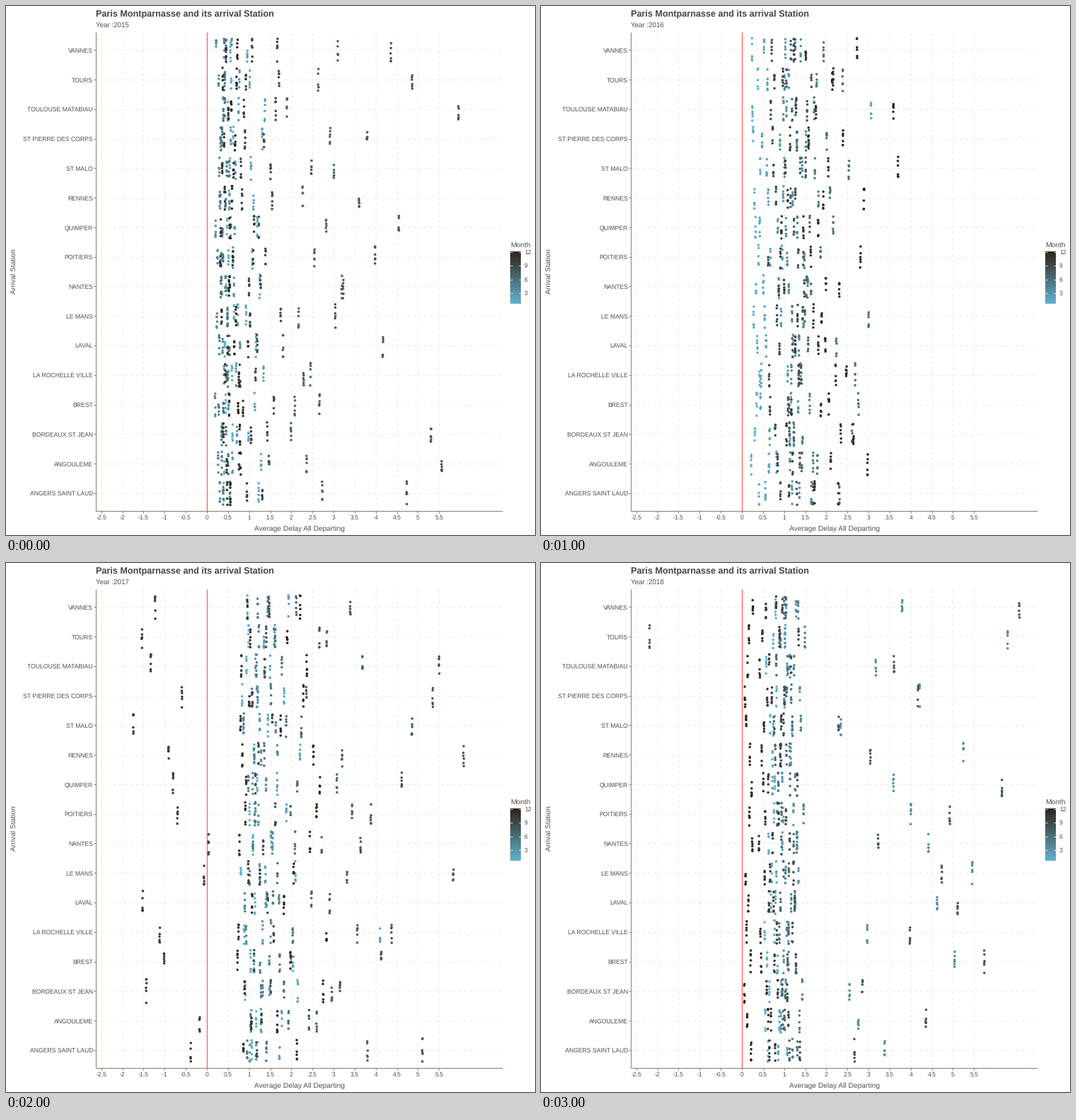
A matplotlib script for the animation above (4000 ms loop, 748 by 748 pixels).

```python
import matplotlib.pyplot as plt
import numpy as np
from matplotlib.animation import FuncAnimation
from matplotlib.colors import LinearSegmentedColormap

SIZE, DPI = 748, 100
PT = 72 / DPI
LEFT, RIGHT, TOP, BOTTOM = 127.5, 702, 37, 713.8
ZERO_X, UNIT = 284, 59.7
FIRST_Y, ROW = 62.3, 41.77
TRIPS = 6
INK, AXIS, GRID = "#505050", "#8b7d6b", "#ecece4"
STATIONS = ["VANNES", "TOURS", "TOULOUSE MATABIAU", "ST PIERRE DES CORPS",
            "ST MALO", "RENNES", "QUIMPER", "POITIERS", "NANTES", "LE MANS",
            "LAVAL", "LA ROCHELLE VILLE", "BREST", "BORDEAUX ST JEAN",
            "ANGOULEME", "ANGERS SAINT LAUD"]

# Mean delay per month, January to December
MEANS = {
    2015: [.52, 1.15, .65, .3, .39, .45, 2.5, 3.7, 1.45, .94, .43, .66],
    2016: [.33, .55, 1.02, 1.22, 1.5, 2.2, 1.4, 1.32, .78, 1.13, 1.9, 2.35],
    2017: [1, 1.8, 1.27, 1.42, 1.08, 1.75, 2.9, 4.25, 1.35, -.75, .9, 2.25],
    2018: [.68, .9, 1.15, 3.9, 1.25, 1.1, .95, 3.7, 1.15, .78, .53, .16],
}
# Delays that stand out, by station and month
EXTREMES = {
    2015: {("TOULOUSE MATABIAU", 8): 5.96, ("ANGOULEME", 8): 5.56,
           ("BORDEAUX ST JEAN", 8): 5.31, ("TOURS", 8): 4.86},
    2016: {("ST MALO", 12): 3.7, ("TOULOUSE MATABIAU", 12): 3.59,
           ("TOULOUSE MATABIAU", 2): 3.06, ("LE MANS", 6): 3},
    2017: {("ST MALO", 10): -1.74, ("LAVAL", 10): -1.52,
           ("TOULOUSE MATABIAU", 8): 5.5, ("LA ROCHELLE VILLE", 2): 4.1},
    2018: {("TOURS", 8): -2.19, ("TOURS", 4): 6.29, ("VANNES", 8): 6.57,
           ("QUIMPER", 8): 6.16, ("BREST", 8): 5.74},
}
YEARS = list(MEANS)
month_map = LinearSegmentedColormap.from_list("month", ["#62b1cc", "#32241c"])

plt.rcParams.update({"font.family": "Liberation Sans", "text.hinting": "none"})


def year_points(year):
    """Spread each month's delays over the stations, wider for long delays."""
    rng = np.random.default_rng(year)
    ranks = np.linspace(-1.6, 1.6, len(STATIONS))
    delay = np.empty((len(STATIONS), 12))
    for month, mean in enumerate(MEANS[year]):
        spread = .06 + .06 * mean ** 2 + .4 * (mean < 0)
        delay[:, month] = mean + spread * rng.permutation(ranks)
    for (station, month), value in EXTREMES[year].items():
        delay[STATIONS.index(station), month - 1] = value
    shape = (len(STATIONS), 12, TRIPS)
    rows = FIRST_Y + ROW * np.arange(len(STATIONS))
    x = ZERO_X + UNIT * delay[:, :, None] + rng.uniform(-.4, .4, shape)
    y = rows[:, None, None] + rng.uniform(-.4, .4, shape) * ROW
    return np.column_stack([x.ravel(), y.ravel()])


points = {year: year_points(year) for year in YEARS}

fig = plt.figure(figsize=(SIZE / DPI, SIZE / DPI), dpi=DPI, facecolor="white")
ax = fig.add_axes([0, 0, 1, 1])
ax.axis("off")


def label(x, y, text, px, ha="left", color=INK, **kwargs):
    return ax.text(x, y, text, fontsize=px * PT, ha=ha, color=color, **kwargs)


def line(x0, y0, x1, y1, color, width=1, **kwargs):
    ax.plot([x0, x1], [y0, y1], color=color, lw=width * PT,
            solid_capstyle="butt", **kwargs)


dashes = dict(dashes=(4, 4), zorder=1)
for i, name in enumerate(STATIONS):
    y = FIRST_Y + ROW * i
    line(LEFT, y, RIGHT, y, GRID, **dashes)
    line(LEFT - 3, y, LEFT, y, AXIS)
    label(123, y + 3.4, name, 8.6, "right")
for tick in np.arange(-2.5, 5.6, .5):
    x = ZERO_X + UNIT * tick
    line(x, BOTTOM, x, TOP, GRID, **dashes)
    line(x, BOTTOM, x, BOTTOM + 3, AXIS)
    label(x, 726, f"{tick:g}", 8.6, "center")
line(LEFT, TOP, LEFT, BOTTOM, AXIS)
line(LEFT, BOTTOM, RIGHT, BOTTOM, AXIS)
line(ZERO_X, TOP, ZERO_X, BOTTOM, "#ff3030", 1.1, alpha=.85, zorder=4)

label(127, 15, "Paris Montparnasse and its arrival Station", 12.63,
      color="#444444", weight="bold")
subtitle = label(127, 31, "", 9.8)
label(414.8, 741.5, "Average Delay All Departing", 10.25, "center")
label(11, 375.3, "Arrival Station", 10.25, "center", va="center", rotation=90)

# Colour bar
label(713, 340.5, "Month", 10.2)
ax.imshow(np.linspace(1, 0, 100)[:, None], cmap=month_map, aspect="auto",
          extent=(713, 728, 420.5, 346.5), zorder=2)
for month in (3, 6, 9, 12):
    y = 347.5 + 6.5 * (12 - month)
    line(713, y, 716, y, "white", .8, zorder=3)
    line(725, y, 728, y, "white", .8, zorder=3)
    label(733, y + 3.4, str(month), 8.6)

month_share = np.tile(np.repeat(np.linspace(0, 1, 12), TRIPS), len(STATIONS))
dots = ax.scatter(*points[YEARS[0]].T, s=(3.5 * PT) ** 2,
                  c=month_map(month_share), linewidths=0, zorder=3)
ax.set(xlim=(0, SIZE), ylim=(SIZE, 0))


def update(i):
    year = YEARS[i % len(YEARS)]
    dots.set_offsets(points[year])
    subtitle.set_text(f"Year :{year}")
    return dots, subtitle


anim = FuncAnimation(fig, update, frames=len(YEARS), interval=1000,
                     repeat=True, repeat_delay=0)
plt.show()
```
